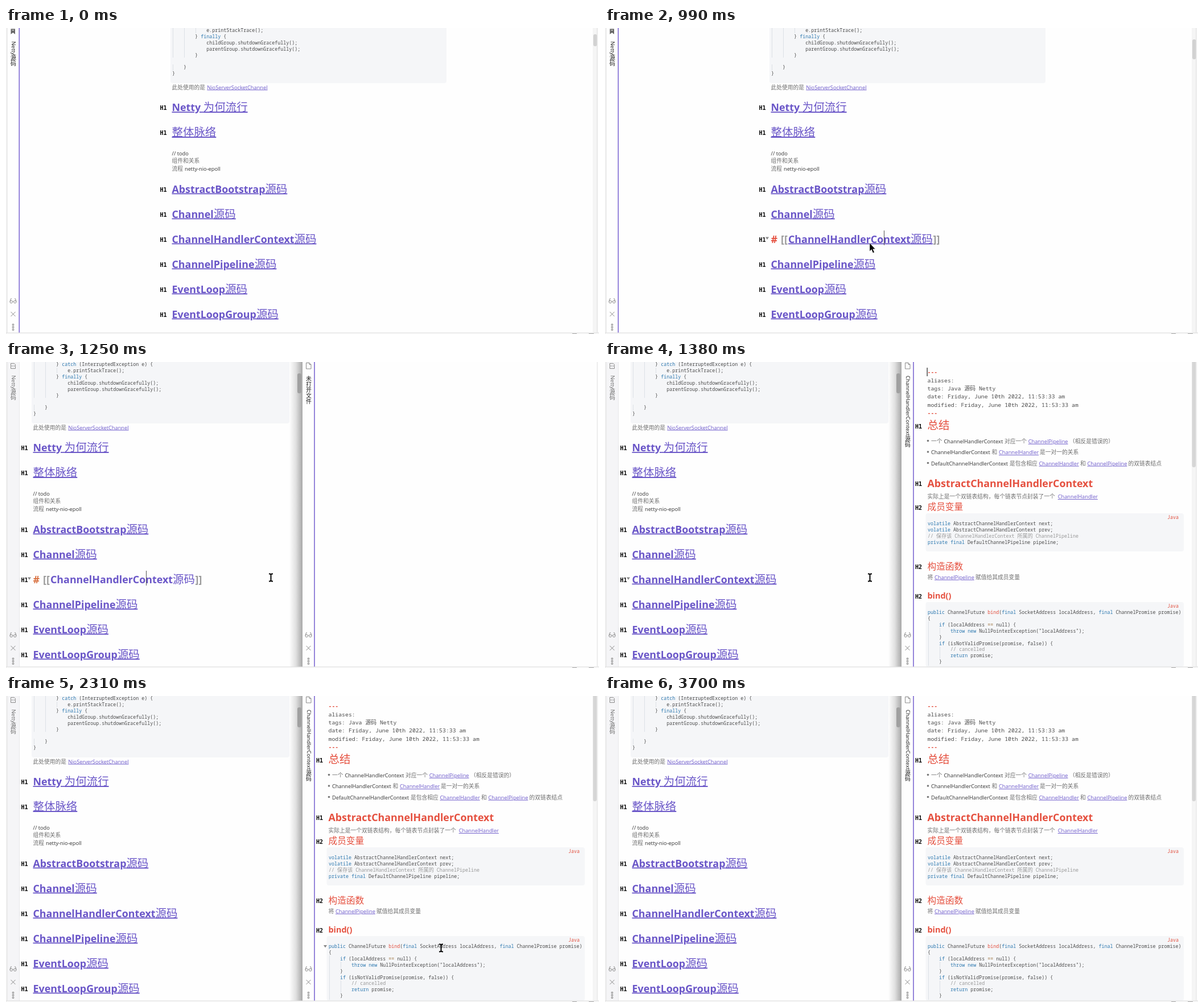
Animation of 1042 by 538 pixels, one loop 3.77 s. Source, as an HTML page:

```html
<!DOCTYPE html>
<html lang="zh-CN">
<head>
<meta charset="utf-8">
<title>Netty源码</title>
<style>
  html, body { margin: 0; width: 100%; height: 100%; overflow: hidden; background: #fefefe; }
  svg { display: block; width: 1042px; height: 538px; }
  text { white-space: pre; fill: #4c4c4c; }
  .p, .link, .tab { font: 9.25px "Open Sans", "Noto Sans CJK SC", "Noto Sans CJK", sans-serif; }
  .p { fill: #333; }
  .p .c, .link .c { font-size: 1.055em; }
  .c { font-family: "Noto Sans CJK SC", "Noto Sans CJK", sans-serif; font-weight: 300; font-size: 1.09em; }
  .p .c { fill: #6e6e6e; }
  .h1, .h2 { font: bold 17.85px "Open Sans", "Noto Sans CJK SC", sans-serif; fill: #e5503f; }
  .h2 { font-size: 14.4px; }
  .h1 .c, .h2 .c { font-weight: 500; }
  .title { fill: #6a56c8; }
  .link { fill: #6d5acb; }
  .u { text-decoration: underline; }
  .code, .yaml { font: 8.36px "Noto Sans Mono", "DejaVu Sans Mono", monospace; }
  .yaml { font-size: 9.83px; }
  .yaml .c { font-size: 1em; }
  .mark { font: bold 10px "DejaVu Sans Mono", monospace; fill: #000; }
  .kw { fill: #2e79b0; }
  .op { fill: #9a6e3a; }
  .fn, .lang, .rule { fill: #e2503f; }
  .rule { font-weight: bold; }
  .note { fill: #999; }
  .tab { writing-mode: vertical-rl; font-size: 9.45px; fill: #1c1c1c; }
  .tab .c { font-size: 1.045em; font-weight: 400; }
  .dim { fill: #6c6c6c; }
  .icon { fill: none; stroke: #8a8a8a; }
  .guide { stroke: #dde1e6; }
</style>
</head>
<body>
<svg id="stage" viewBox="0 0 1042 538" xmlns="http://www.w3.org/2000/svg"></svg>
<script>
const LOOP = 3770, LINE = 10.9;
const KEYWORDS = /\b(volatile|private|final|public|if|throw|new|return|finally|catch)\b/g;

const text = (x, y, cls, s) =>
  `<text x="${x}" y="${y}" class="${cls}">${s.replace(/[\u3000-\uffef]+/g, '<tspan class="c">$&</tspan>')}</text>`;
const code = (x, y, s) => s.startsWith('//')
  ? text(x, y, 'code note', s)
  : text(x, y, 'code', s.replace(KEYWORDS, '<tspan class="kw">$1</tspan>')
      .replace(' == ', ' <tspan class="op">==</tspan> ')
      .replace(/bind(?=\()/, '<tspan class="fn">bind</tspan>'));
// Each line is an indent level followed by its code.
const block = (x, y, lines) => lines.map(([depth, s], i) => code(x + depth * 20.06, y + i * LINE, s)).join('');
const rect = (x, y, w, h, fill, extra = '') =>
  `<rect x="${x}" y="${y}" width="${w}" height="${h}" fill="${fill}" ${extra}/>`;
const guide = (x, y1, y2) => `<path class="guide" d="M${x} ${y1}V${y2}"/>`;
const row = (y, ...parts) => parts.map(([x, s, link]) => text(x, y, link ? 'link u' : 'p', s)).join('');
const group = (id, body) => `<g id="${id}">${body}</g>`;
const fold = id => `<path id="${id}" d="M-3-2H3L0 2.5z" fill="#888"/>`;

const tools = x => `<g class="icon" transform="translate(${x})">
  <path d="M-5.5 481l1.5-5h1.5M5.5 481l-1.5-5H2.5M-1 481q1-1 2 0"/>
  <circle cx="-3.3" cy="481.5" r="2.2"/><circle cx="3.3" cy="481.5" r="2.2"/>
  <path d="M-4 499l8 8M4 499l-8 8"/>
  <path d="M-1.2 520.5h2.4v2.4h-2.4zM-1.2 524.8h2.4v2.4h-2.4zM-1.2 529.1h2.4v2.4h-2.4z"/></g>`;

const headings = [
  [146, 'Netty 为何流行'], [190, '整体脉络'], [289.5, 'AbstractBootstrap源码'], [333.5, 'Channel源码'],
  [377.5, 'ChannelHandlerContext源码'], [421.5, 'ChannelPipeline源码'],
  [465.5, 'EventLoop源码'], [509.5, 'EventLoopGroup源码']
];
const ACTIVE = 4;

const note = group('note',
  rect(289, -40, 485, 137, '#f5f6f8', 'id="noteCode" rx="4"') +
  guide(293.5, -14, 52) + guide(293.5, 64, 75) + guide(313.5, -14, 52) + guide(333.5, -1, 9) +
  block(292, 7 - LINE, [[2, '} catch (InterruptedException e) {'], [3, 'e.printStackTrace();'], [2, '} finally {'],
    [3, 'childGroup.shutdownGracefully();'], [3, 'parentGroup.shutdownGracefully();'], [2, '}'],
    [0, ''], [1, '}'], [0, '}']]) +
  row(107.5, [291.5, '此处使用的是'], [353.3, 'NioServerSocketChannel', 1]) +
  row(223.5, [291.5, '// todo']) + row(237.3, [291.5, '组件和关系']) +
  row(251, [291.5, '流程'], [314, 'netty-nio-epoll']) +
  headings.map(([y, s], i) => text(270.5, y - 2, 'mark', 'H1') +
    `<g id="head${i}">${text(291.5, y, 'h1 title u', s)}</g>`).join('') +
  group('edit', text(291.5, 377.5, 'h1', '<tspan id="hash">#</tspan>') +
    text(309, 377.5, 'h1 note', '[[') +
    `<g id="editLink">${text(322, 377.5, 'h1 title', headings[ACTIVE][1])}</g>` +
    text(576.5, 377.5, 'h1 note', ']]') + rect(490, 356, 1, 26, '#555')) +
  fold('noteFold'));

const single = group('single',
  rect(22.5, 0, 1.6, 536, '#7d68d2') + rect(1031, 0, 8, 536, '#f5f5f5') +
  rect(1032, 11, 6.5, 21, '#d2d2d2', 'id="thumb" rx="3"') +
  '<path d="M8.5 1.5h7.5v9.5l-3.7-3-3.8 3z" fill="#666"/><path d="M10.5 4h3.5" stroke="#fff"/>' +
  text(13, 23.5, 'tab', 'Netty源码'));

const content = group('content',
  text(566.5, 20.8, 'yaml rule', '---') +
  ['aliases:', 'tags: Java 源码 Netty', 'date: Friday, June 10th 2022, 11:53:33 am',
   'modified: Friday, June 10th 2022, 11:53:33 am'].map((s, i) => text(566.5, 35.5 + i * 14.4, 'yaml', s)).join('') +
  text(566.5, 93, 'yaml rule', '---') +
  [[116.5, 'H1'], [218, 'H1'], [260, 'H2'], [363.5, 'H2'], [415.5, 'H2']].map(([y, s]) => text(545, y, 'mark', s)).join('') +
  text(566.5, 118, 'h1', '总结') +
  [138.5, 158, 177.5].map(y => `<circle cx="567.5" cy="${y}" r="1.8" fill="#777"/>`).join('') +
  row(142.8, [573, '一个'], [595.5, 'ChannelHandlerContext'], [702, '对应一个'],
    [743.7, 'ChannelPipeline', 1], [816, '（相反是错误的）']) +
  row(162.2, [573, 'ChannelHandlerContext'], [679.5, '和'], [692, 'ChannelHandler', 1], [764, '是一对一的关系']) +
  row(181.7, [573, 'DefaultChannelHandlerContext'], [711, '是包含相应'], [762.5, 'ChannelHandler', 1],
    [835, '和'], [847.5, 'ChannelPipeline', 1], [919.5, '的双链表结点']) +
  text(566.5, 220, 'h1', 'AbstractChannelHandlerContext') +
  row(240, [566.5, '实际上是一个双链表结构，每个链表节点封装了一个'], [795.7, 'ChannelHandler', 1]) +
  text(566.5, 260, 'h2', '成员变量') +
  rect(563.5, 266, 453.5, 67, '#f5f6f8', 'rx="4"') + text(988, 276, 'code lang', 'Java') +
  block(567, 287, [[0, 'volatile AbstractChannelHandlerContext next;'], [0, 'volatile AbstractChannelHandlerContext prev;'],
    [0, '// 保存该 ChannelHandlerContext 所属的 ChannelPipeline'], [0, 'private final DefaultChannelPipeline pipeline;']]) +
  text(566.5, 364.5, 'h2', '构造函数') +
  row(381.7, [566.5, '将'], [579, 'ChannelPipeline', 1], [651, '赋值给其成员变量']) +
  text(566.5, 415.5, 'h2', 'bind()') +
  rect(563.5, 422, 453.5, 114, '#f5f6f8', 'rx="4"') + text(988, 432, 'code lang', 'Java') +
  guide(568.5, 456, 534) + guide(588.5, 467, 478) + guide(588.5, 500, 522) +
  block(567, 443, [
    [0, 'public ChannelFuture bind(final SocketAddress localAddress, final ChannelPromise promise)'], [0, '{'],
    [1, 'if (localAddress == null) {'], [2, 'throw new NullPointerException("localAddress");'], [1, '}'],
    [1, 'if (isNotValidPromise(promise, false)) {'], [2, '// cancelled'], [2, 'return promise;'], [1, '}']]) +
  rect(1031, 0, 7, 536, '#f5f5f5') + rect(1031.5, -5, 6.5, 190, '#d6d6d6', 'rx="3"') +
  text(532, 24, 'tab', 'ChannelHandlerContext源码') +
  `<g transform="translate(561 440)">${fold('codeFold')}</g>` +
  rect(565.5, 10, 1.3, 15, '#333', 'id="caret"'));

const split = group('split',
  rect(2.5, 0, 21, 536, '#f5f5f7') + rect(23, 0, 1, 536, '#e8e8ea') +
  '<path class="icon" d="M8.5 2.5h6l2 2v7h-8zM11.5 5.5l-1.3 1.5 1.3 1.5M13.5 5.5l1.3 1.5-1.3 1.5"/>' +
  text(13, 23.5, 'tab dim', 'Netty源码') +
  rect(498, 0, 23, 536, 'url(#shade)') + rect(512, 20, 7, 35, '#a0a0a0', 'rx="3"') +
  rect(521, 0, 521, 536, '#fefefe') + rect(541.2, 0, 1.6, 536, '#7d68d2') +
  '<path class="icon" d="M527.5 1.5h5.5l3 3v7.5h-8.5zM533 1.5v3h3"/>' + tools(531.5) +
  group('empty', text(532, 24.5, 'tab', '未打开文件')) + content);

const $ = id => document.getElementById(id);
$('stage').innerHTML =
  `<defs><linearGradient id="shade"><stop offset="0" stop-color="#999" stop-opacity="0"/>
   <stop offset=".5" stop-color="#999" stop-opacity=".3"/><stop offset="1" stop-color="#999" stop-opacity=".85"/></linearGradient></defs>` +
  rect(0, 0, 1042, 538, '#fefefe') + note + single + split + tools(12.5) +
  rect(0, 0, 1.5, 538, '#f3f3f3') + rect(1.5, 0, 1, 536, '#dcdcdc') + rect(1038.5, 0, 1, 536, '#dcdcdc') +
  rect(0, 535.5, 1042, 1.2, '#e0e0e0') + rect(995, 537, 8, 1, '#aaa') + rect(1024, 537, 9, 1, '#aaa') +
  group('beam', '<path d="M-3-6.5H-1L.5-5.5 2-6.5H4M-3 6.5H-1L.5 5.5 2 6.5H4M.5-6V6" fill="none" stroke="#000" stroke-width="2"/>') +
  group('arrow', '<path d="M0 0V14.5L3.3 11.5 5.8 17.5 8.3 16.4 5.8 10.7H10z" stroke="#fff" stroke-width=".5"/>');

// Pointer samples: time, x, y, shape.
const pointer = [
  [120, 818, 500, 'beam'], [190, 768, 484, 'beam'], [260, 698, 462, 'beam'], [320, 625, 437, 'beam'],
  [390, 558, 412, 'beam'], [450, 506, 394, 'beam'], [520, 472, 383, 'beam'], [590, 465, 386, 'beam'],
  [660, 465, 378, 'arrow'], [1250, 465, 379, 'beam'], [2110, 500, 386, 'beam'], [2180, 590, 405, 'beam'],
  [2240, 684, 426, 'beam'], [2310, 764, 443, 'beam'], [2380, 835, 467, 'beam'], [2440, 897, 492, 'beam'],
  [2510, 948, 513, 'beam'], [2580, 984, 527, 'beam'], [2640, 996, 529, 'arrow'], [2710, 0, 0, '']
];
const between = (t, a, b) => t >= a && t < b;
const show = (id, on) => { $(id).style.display = on ? '' : 'none'; };
const place = (id, x, y) => $(id).setAttribute('transform', `translate(${x} ${y})`);

function render(t) {
  const isSplit = t >= 1250, isLoaded = t >= 1380, isEditing = between(t, 920, 1380);
  const [dx, dy] = isSplit ? [-244, 11] : [0, 0];
  const codeWidth = isSplit ? 453 : 485;

  show('single', !isSplit);
  show('split', isSplit);
  show('empty', !isLoaded);
  show('content', isLoaded);
  place('note', dx, dy);
  $('noteCode').setAttribute('width', codeWidth);
  $('thumb').setAttribute('y', t < 990 ? 11 : 20);
  $('thumb').setAttribute('height', t < 990 ? 21 : 35);

  show('edit', isEditing);
  show('head' + ACTIVE, !isEditing);
  $('hash').style.fill = isSplit ? '#d8703f' : '#e5503f';
  $('editLink').firstChild.style.textDecoration = isSplit ? 'none' : 'underline';
  show('caret', between(t, 1380, 1910) || between(t, 2440, 2970) || between(t, 3500, 3700));

  const [, x, y, shape] = pointer.findLast(p => p[0] <= t) || [0, 0, 0, ''];
  for (const id of ['beam', 'arrow']) show(id, shape === id);
  if (shape) place(shape, x, y);

  const hovered = shape && x - dx < 289 + codeWidth && headings.find(([base]) => Math.abs(y - dy - base + 7) < 16);
  show('noteFold', hovered);
  if (hovered) place('noteFold', 285, hovered[0] - 8);
  show('codeFold', shape && x > 543 && between(y, 434, 446));
}

function tick() {
  render(performance.now() % LOOP);
  requestAnimationFrame(tick);
}
tick();
</script>
</body>
</html>
```
